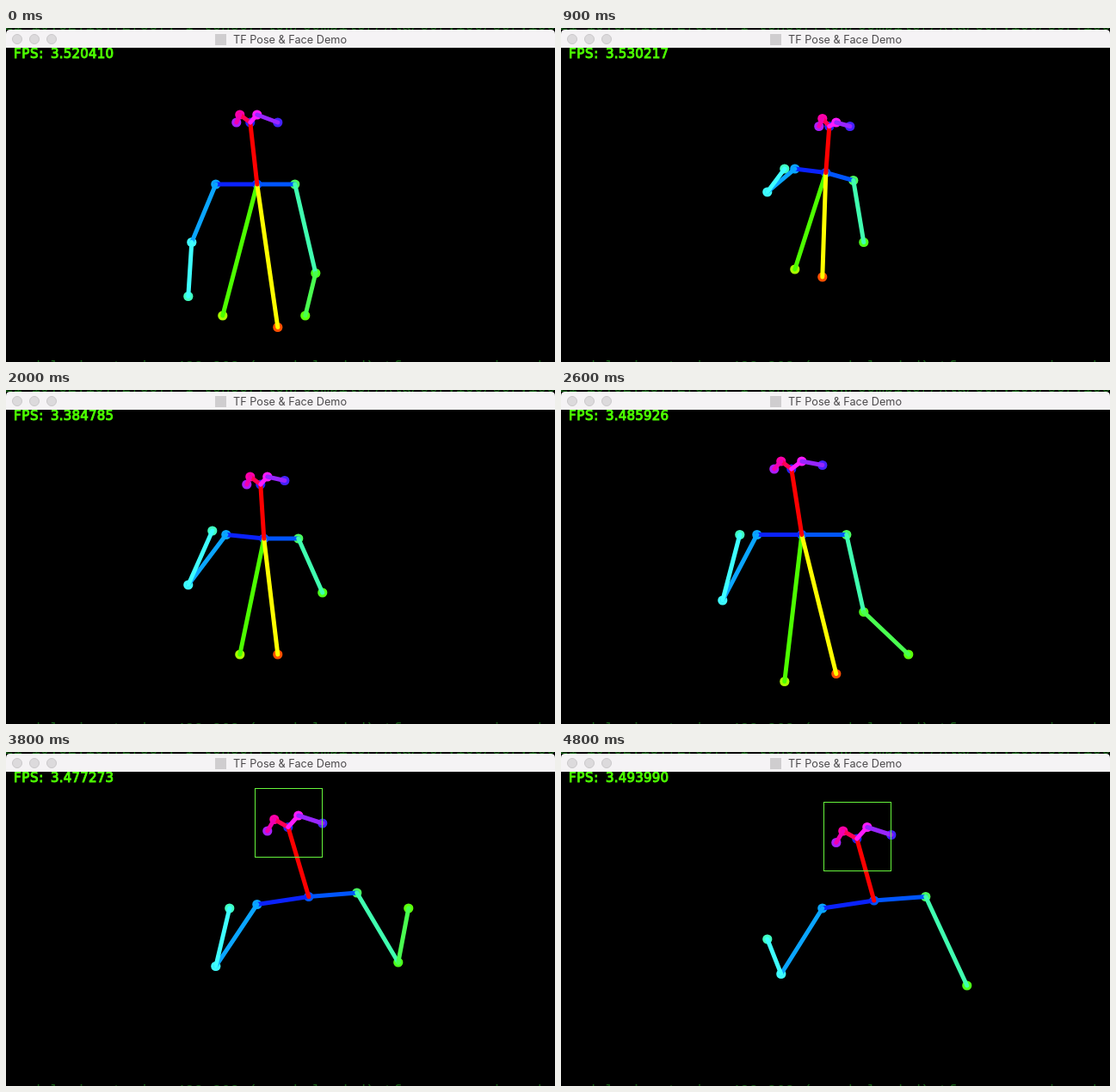
Recreate the animation shown at these times as an HTML page. Size 638 px wide and 389 px high, loop 5000 ms.

```html
<!DOCTYPE html>
<html lang="en">
<head>
<meta charset="utf-8">
<title>Pose demo</title>
<style>
  html, body { margin: 0; width: 100%; height: 100%; overflow: hidden; background: #000; }
  svg { display: block; width: 638px; height: 389px; }
  .term { font: 17.5px "Liberation Mono", monospace; fill: #176017; white-space: pre; }
  .title { font: 12.7px Inter, sans-serif; fill: #4b494b; }
  .fps { font: 15px "DejaVu Sans", sans-serif; fill: #4dff00; stroke: #4dff00; stroke-width: 1; }
</style>
</head>
<body>
<svg viewBox="0 0 638 389">
  <rect width="638" height="389" fill="#000"/>
  <text class="term" x="-2" y="2">21 19:52:13.727337: I tensorflow/compiler/xla/service/service</text>
  <text class="term" x="-2" y="400">_model: input_size=432x368 (graph loaded) tf_pose session ok</text>
  <rect y="23" width="638" height="362" fill="#000"/>
  <text class="fps" x="9" y="35" letter-spacing=".7">FPS:</text>
  <text class="fps" id="fps" x="52" y="35" letter-spacing=".2"></text>
  <g id="dots"></g>
  <g id="bones" stroke-width="5" stroke-linecap="round"></g>
  <rect id="face" width="78" height="80" fill="none" stroke="#66f53c"/>
  <path d="M0 23V7Q0 2 5 2H633Q638 2 638 7V23Z" fill="#f5f3f5"/>
  <g fill="#dcdadc" stroke="#cac8ca">
    <circle cx="13" cy="13" r="5.5"/><circle cx="33" cy="13" r="5.5"/><circle cx="53" cy="13" r="5.5"/>
  </g>
  <rect x="243" y="7" width="13" height="13" fill="#cfcdcf"/>
  <text class="title" x="264" y="18">TF Pose &amp; Face Demo</text>
</svg>
<script>
const LOOP = 5000, TICK = 100;
const FRAME = 288;   // ms the camera needs for one pose
const LAST = 16;

// Key poses. Shoulders and right arm are two points each;
// the left wrist is relative to its elbow, the hips to the neck.
const poses = [
  { frame: 0, rate: 3.520410, nose: [283, 110], shoulders: [243, 182, 335, 182],
    armR: [215, 249, 211, 312], elbowL: [359, 285], wristL: [-12, 50], hips: [-40, 153, 24, 166] },
  { frame: 3, rate: 3.530217, nose: [311, 114], shoulders: [271, 164, 339, 177],
    armR: [239, 191, 259, 164], elbowL: [351, 249], hips: [-34, 110, -2, 120] },
  { frame: 5, rate: 3.351071, nose: [303, 114], shoulders: [263, 168, 343, 177],
    armR: [219, 218, 247, 164], elbowL: [371, 231], hips: [-28, 126, 12, 130] },
  { frame: 9, rate: 3.485926, nose: [267, 92], shoulders: [227, 168, 331, 168],
    armR: [187, 245, 207, 168], elbowL: [351, 258], wristL: [52, 50], hips: [-20, 171, 40, 162] },
  { frame: 11, rate: 3.422097, nose: [315, 83], shoulders: [267, 164, 379, 168],
    armR: [223, 231, 259, 155], elbowL: [411, 267] },
  { frame: 13, rate: 3.477273, nose: [327, 87], shoulders: [291, 177, 407, 164],
    armR: [243, 249, 259, 182], elbowL: [455, 245], wristL: [12, -63] },
  { frame: LAST, rate: 3.493990, nose: [343, 101], shoulders: [303, 182, 423, 168],
    armR: [255, 258, 239, 218], elbowL: [471, 272] },
];
poses.forEach((p, i) => p.hips ??= poses[i - 1].hips);

const joints = {
  nose: "#2222ff", neck: "#0055ff",
  rShoulder: "#0aa5ff", rElbow: "#3fffff", rWrist: "#40ffc0",
  lShoulder: "#4aff60", lElbow: "#4dff1a", lWrist: "#5cff0a",
  rHip: "#aaff00", lHip: "#ff5000",
  rEye: "#ff00aa", lEye: "#ff1aff", rEar: "#aa1eff", lEar: "#4422ff",
};

const bones = [
  ["neck", "rShoulder", "#0a22ff"],
  ["neck", "lShoulder", "#0055ff"],
  ["rShoulder", "rElbow", "#0aa5ff"],
  ["rElbow", "rWrist", "#3fffff"],
  ["lShoulder", "lElbow", "#40ffb0"],
  ["lElbow", "lWrist", "#4aff50"],
  ["neck", "rHip", "#4dff00"],
  ["neck", "lHip", "#ffff00"],
  ["neck", "nose", "#ff0000"],
  ["nose", "rEye", "#ff0055"],
  ["rEye", "rEar", "#f000b0"],
  ["nose", "lEye", "#ff1aff"],
  ["lEye", "lEar", "#9826ff"],
];

const $ = id => document.getElementById(id);
const snap = (v, base, size) => base + Math.round((v - base) / size) * size;
const mix = (a, b, u) => a + (b - a) * u;
const shift = ([x, y], [dx, dy]) => [x + dx, y + dy];

function add(parent, tag, attrs) {
  const el = document.createElementNS("http://www.w3.org/2000/svg", tag);
  set(el, attrs);
  return $(parent).appendChild(el);
}

function set(el, attrs) {
  for (const name in attrs) el.setAttribute(name, attrs[name]);
}

function show(el, visible) {
  el.style.display = visible ? "" : "none";
}

const dots = {};
for (const name in joints) dots[name] = add("dots", "circle", { r: 5.6, fill: joints[name] });
const lines = bones.map(([a, b, stroke]) => ({ a, b, el: add("bones", "line", { stroke }) }));

// All joints and the frame rate at camera frame n
function skeleton(n) {
  const i = poses.findLastIndex(p => p.frame <= n);
  const a = poses[i], b = poses[i + 1] ?? a;
  const u = a === b ? 0 : (n - a.frame) / (b.frame - a.frame);
  const at = key => a[key].map((v, k) => mix(v, b[key][k], u));

  const nose = at("nose"), elbowL = at("elbowL"), arm = at("armR"), hips = at("hips");
  const [rx, ry, lx, ly] = at("shoulders");
  const neck = [(rx + lx) / 2, (ry + ly) / 2];
  const body = {
    nose, neck,
    rShoulder: [rx, ry], rElbow: arm.slice(0, 2), rWrist: arm.slice(2),
    lShoulder: [lx, ly], lElbow: elbowL,
  };

  // The head grows with the shoulders and tilts with the neck
  const size = (lx - rx) / 92;
  const tilt = .6 * Math.atan2(nose[0] - neck[0], neck[1] - nose[1]);
  const c = size * Math.cos(tilt), s = size * Math.sin(tilt);
  const onHead = (x, y) => shift(nose, [x * c - y * s, x * s + y * c]);
  body.rEye = onHead(-10, -9);
  body.lEye = onHead(10, -9);
  body.rEar = onHead(-18, 0);
  body.lEar = onHead(31, 0);

  // Limbs that the detector loses now and then
  const wrist = n - a.frame <= 1 && a.wristL || b.frame - n <= 1 && b.wristL;
  if (wrist) body.lWrist = shift(elbowL, wrist);
  if (n < 11 || n === 14 || n === 15) {
    body.rHip = shift(neck, hips.slice(0, 2));
    body.lHip = shift(neck, hips.slice(2));
  }
  return { body, rate: mix(a.rate, b.rate, u) };
}

function draw(n) {
  const { body, rate } = skeleton(n);
  const at = {};
  for (const name in dots) {
    const p = body[name];
    show(dots[name], p);
    if (!p) continue;
    // Joints sit on the cells of the heat map
    at[name] = { x: snap(p[0], 3, 4) + .8, y: snap(p[1], 2, 4.5) };
    set(dots[name], { cx: at[name].x, cy: at[name].y });
  }
  for (const { a, b, el } of lines) {
    const p = at[a], q = at[b];
    show(el, p && q);
    if (p && q) set(el, { x1: p.x, y1: p.y, x2: q.x, y2: q.y });
  }
  const [x, y] = body.nose;
  show($("face"), n >= 11);
  set($("face"), { x: snap(x - 39, 1, 16) + .5, y: snap(y - 43, 10, 16) + .5 });
  $("fps").textContent = rate.toFixed(6);
}

const start = performance.now();
let shown = -1;
function tick() {
  const t = Math.max(0, performance.now() - start) % LOOP;
  const n = Math.min(LAST, Math.floor(Math.floor(t / TICK) * TICK / FRAME));
  if (n !== shown) draw(shown = n);
  requestAnimationFrame(tick);
}
tick();
</script>
</body>
</html>
```
